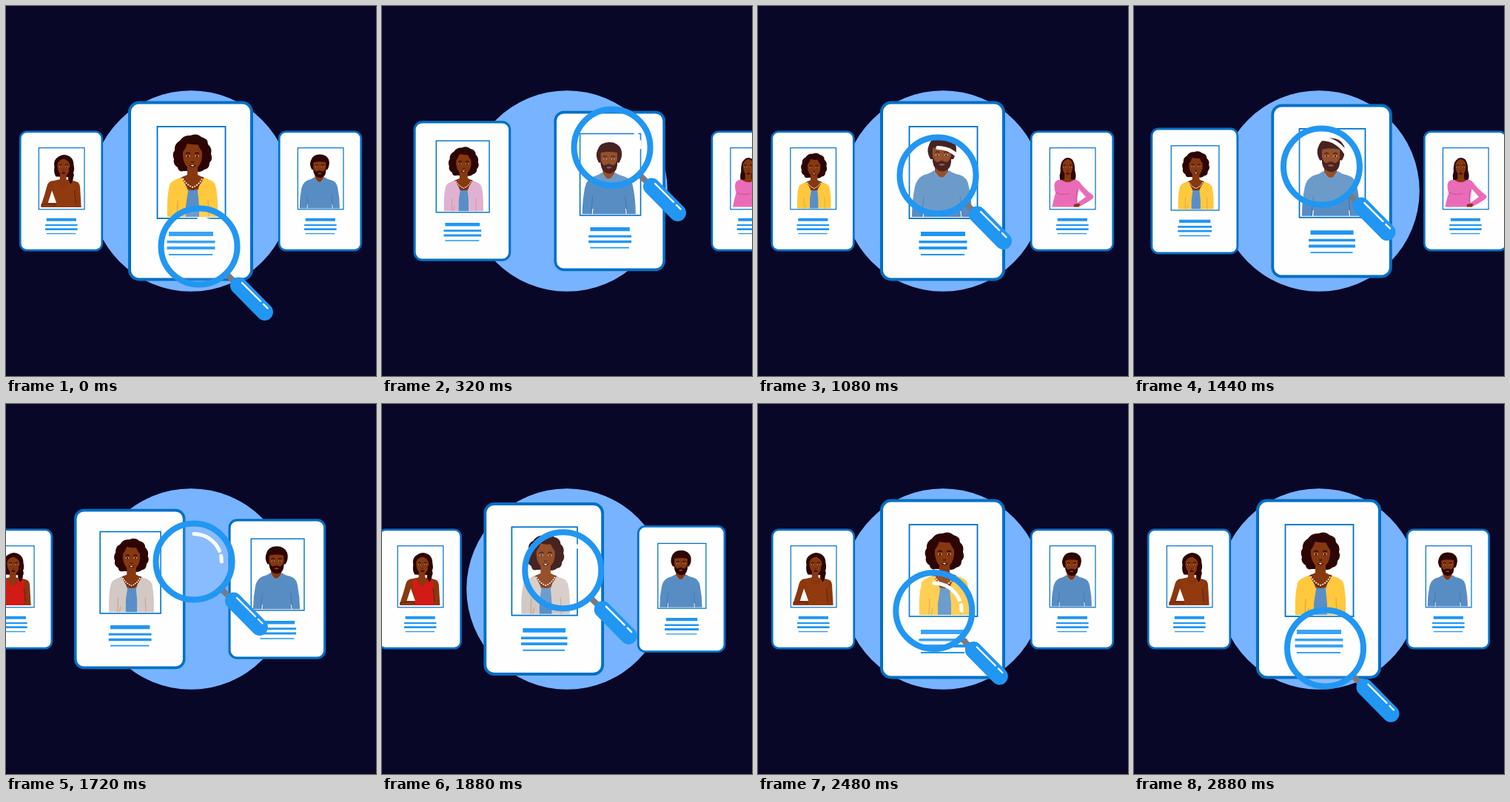
Recreate the animation shown at these times as an HTML page. Size 500 px wide and 500 px high, loop 2920 ms.

```html
<!DOCTYPE html>
<html lang="en">
<head>
<meta charset="utf-8">
<title>Candidate search</title>
<style>
  html, body { margin: 0; width: 100%; height: 100%; overflow: hidden; background: #080728; }
  svg { display: block; width: 100%; height: 100%; }
</style>
</head>
<body>
<svg viewBox="0 0 500 500">
  <defs>
    <g id="sheet">
      <rect x="167" y="130.5" width="165" height="239" rx="13" fill="#fefefe" stroke="#0070c6" stroke-width="4"/>
      <rect x="204.5" y="163" width="92" height="124" fill="#fff" stroke="#0070c6" stroke-width="1.8"/>
      <path fill="#2196f3" d="M220 305h60v6h-60zM217.5 317h65v3.6h-65zM217.5 325h65v4h-65zM220 335h59v2h-59z"/>
    </g>
    <g id="features">
      <path d="M-9-3.5q3-2 6 0M3-3.5q3-2 6 0" fill="none" stroke="#2b0503" stroke-width="1.4"/>
      <path d="M-9 0q3-2.5 6 0q-3 2-6 0M3 0q3-2.5 6 0q-3 2-6 0" fill="#e9d9d2"/>
      <circle cx="-6" r="1.3" fill="#200"/><circle cx="6" r="1.3" fill="#200"/>
      <path d="M-2 7q2 2 4 0" fill="none" stroke="#4e1a08" stroke-width="1.3"/>
      <path d="M-4.5 12.5q4.5-3 9 0q-4.5 4.5-9 0" fill="#4a0a0c"/>
    </g>
  </defs>

  <rect width="500" height="500" fill="#080728"/>
  <circle cx="250" cy="250" r="135.8" fill="#77b3ff"/>

  <g id="braid">
    <use href="#sheet"/>
    <path fill="#2d0503" d="M236 201q-3-14 8-20q10-8 22-1q9 5 9 19q2 8-1 14q3 6-1 11q1 7-5 13q-5-7-4-15l-25-1q-5-8-3-20z"/>
    <path fill="#8b3710" d="M247 215h13v12q18 3 23 5q5 3 5 16l2 35h-80q-3-2 0-7q7-20 11-36q2-8 9-10q12-2 17-4z"/>
    <path id="top" d="M235 231l8-1q4 13 11 13q8 0 11-14l10 2q5 20 2 52h-38q2-20-4-30z"/>
    <path fill="#fff" d="M231 249l-8 25h17z"/>
    <path fill="none" stroke="#5c210a" stroke-width="1.4" d="M209 278q16-4 31 1M276 248l3 27"/>
    <path fill="#86380f" d="M242 195q3-8 13-10q9 3 12 11q1 14-5 20q-7 9-14 0q-7-8-6-21z"/>
    <path fill="#2d0503" d="M265 203q10 1 8 17q2 8-4 16q-6-6-4-14z"/>
    <use href="#features" x="254.500" y="201"/>
  </g>

  <g id="lady">
    <use href="#sheet"/>
    <path fill="#2d0503" d="M240 223q-7 2-8-5q-7-4-5-11q-3-7 1-12q-1-9 7-13q5-8 14-7q9-4 15 2q9 2 9 10q6 5 4 13q3 7-2 12q0 8-7 9q-5 5-12 2z"/>
    <path fill="#86380f" d="M245 214h14v14l12 6l-10 18h-18l-11-18l13-6z"/>
    <path fill="#598fc6" d="M243 247q9 4 18 0v38h-18z"/>
    <path id="jacket" d="M238 232q6 11 8 18l-3 20v15h-25q-1-27 3-43q2-7 17-10zM266 232q-5 9-7 18l2 20v15h25q1-27-3-43q-2-7-17-10z"/>
    <path fill="none" stroke="#b88b45" stroke-opacity=".55" stroke-width="1.2" d="M232 263l-1 22M236 276l-2 9M273 262l1 23"/>
    <path fill="none" stroke="#75280b" stroke-width="3" d="M239 231q5 13 13 16q9-3 14-16"/>
    <path fill="none" stroke="#fff2e2" stroke-width="1.8" stroke-dasharray="2 1.400" d="M239 233q5 9 13 12q9-3 13-12"/>
    <path fill="#86380f" d="M239 197q4-5 6-11q9 2 14 1q3 6 6 10q1 14-6 21q-7 8-14 0q-7-8-6-21z"/>
    <use href="#features" x="252" y="203"/>
    <path fill="#fff" d="M249.500 215.300q2.500-1 5 0l-2.500 1.500z"/>
  </g>

  <g id="man">
    <use href="#sheet"/>
    <path fill="#86380f" d="M239 213h18v11l-9 12l-9-12z"/>
    <path fill="#588dc3" d="M238 222q10 19 20 0q5 4 14 6q11 3 13 16q4 20 4 41h-81q0-21 4-41q3-12 13-16q8-2 13-6z"/>
    <path fill="none" stroke="#3f72a8" stroke-width="1" d="M224 257l-3 28M273 257l3 28"/>
    <path fill="none" stroke="#fff" stroke-width="1.2" d="M224 277l-1 9M274 277l1 9"/>
    <path fill="#2d0503" d="M233 207q-6-10-2-19q4-12 18-12q13 0 18 11q3 10-3 20z"/>
    <path fill="#86380f" d="M236 192q12-3 25 0v18q-2 12-12.500 13q-10-1-12.500-13z"/>
    <path fill="#2d0503" d="M236 203q3 8 6 8q6-3 12 0q4 0 7-8q1 15-5 18q-7 5-14 0q-7-4-6-18z"/>
    <use href="#features" x="248.500" y="201.500"/>
    <path fill="#8d4025" d="M244 214q4.500-2 9 0q-4.500 4-9 0"/>
  </g>

  <g id="pink">
    <use href="#sheet"/>
    <path fill="#2d0503" d="M225 228q-2-9 1-17q-1-17 5-23q8-9 18-2q6 6 6 23q4 11 0 20z"/>
    <path fill="#86380f" d="M234 212h13v14l10 3l-16 8l-15-8l8-3z"/>
    <path fill="#ea6cb9" d="M226 227q15 11 28 0q9 1 13 8q10 13 25 24q2 4-2 7q-12 9-27 16h-54q3-16 7-28q-5-16 0-23q4-4 10-4z"/>
    <path fill="#fff" d="M263 246l14 16l-17 12q-1-12 3-28z"/>
    <path fill="none" stroke="#c54b98" stroke-width="1.3" d="M217 253q14 7 27 2M260 247q-4 13-2 26"/>
    <path fill="#86380f" d="M253 277q8-3 13-1l-3 6h-10z"/>
    <path fill="#86380f" d="M230 195q5-9 11-9q7 1 10 10q0 14-5 20q-6 7-11 0q-6-8-5-21z"/>
    <use href="#features" x="240.500" y="202"/>
  </g>

  <g id="lens" fill="none" stroke-linecap="round">
    <circle r="48" fill="#fff" fill-opacity=".12"/>
    <path stroke="#777b80" stroke-width="8" stroke-linecap="butt" d="M35 35L48 48"/>
    <circle r="51.500" stroke="#2196f3" stroke-width="8"/>
    <path stroke="#2196f3" stroke-width="23" d="M53.500 53L88.500 88.500"/>
    <path stroke="#fff" stroke-width="2.400" d="M58 49L83 74M87 78L92.500 83.500"/>
    <path stroke="#fff" stroke-width="5" d="M0-37.500A37.500 37.500 0 0 1 34.500-14.500M36.700-8L37.300 0"/>
  </g>
</svg>
<script>
const LOOP = 2920, STEP = 40, SLIDE = 600, BACK = 1400, SMALL = 0.67;
const $ = id => document.getElementById(id);
const mix = (a, b, p) => a + (b - a) * p;

// Lens centre over time: [ms, x, y]
const path = [
  [0, 261, 325], [320, 311, 191], [600, 234, 200], [1080, 243, 229],
  [1720, 254, 213], [2120, 230, 249], [2800, 255, 317], [2880, 258.5, 330]
];

function key(i) {
  const n = path.length, turn = Math.floor(i / n);
  const [t, x, y] = path[i - turn * n];
  return [t + turn * LOOP, x, y];
}

function slope(i, axis) {
  const a = key(i - 1), b = key(i), c = key(i + 1);
  const before = b[0] - a[0], after = c[0] - b[0];
  return ((b[axis] - a[axis]) / before * after + (c[axis] - b[axis]) / after * before) / (before + after);
}

function lensAt(t, axis) {
  let i = path.length - 1;
  while (path[i][0] > t) i--;
  const a = key(i), b = key(i + 1), span = b[0] - a[0];
  const u = (t - a[0]) / span, v = 1 - u;
  return v * v * (1 + 2 * u) * a[axis] + u * u * (3 - 2 * u) * b[axis]
    + span * u * v * (v * slope(i, axis) - u * slope(i + 1, axis));
}

function slide(t, start) {
  const u = Math.min(1, Math.max(0, (t - start) / SLIDE));
  return u + 0.54 * u * (1 - u);
}

function place(id, x, scale) {
  $(id).setAttribute("transform", `translate(${x} 250) scale(${scale}) translate(-249.5 -250)`);
}

function draw(t) {
  const p = slide(t, 0) - slide(t, BACK);
  place("braid", mix(74.5, -130, p), SMALL);
  place("lady", mix(249.5, 74, p) - 108 * p * (1 - p), mix(1, SMALL, p));
  place("man", mix(424.5, 249.5, p), mix(SMALL, 1, p));
  place("pink", mix(655, 424.5, p), SMALL);

  const leaving = t > 120 && t < 500, returning = t > 1480 && t < 1920;
  $("jacket").setAttribute("fill", leaving ? "#dfb2d2" : returning ? "#d2c8c5" : "#ffc83d");
  $("top").setAttribute("fill", leaving || returning ? "#d21a17" : "#913a10");
  $("lens").setAttribute("transform", `translate(${lensAt(t, 1)} ${lensAt(t, 2)})`);
}

const begin = performance.now();
function tick() {
  const t = (performance.now() - begin) % LOOP;
  draw(Math.floor(t / STEP) * STEP);
  requestAnimationFrame(tick);
}
draw(0);
requestAnimationFrame(tick);
</script>
</body>
</html>
```
